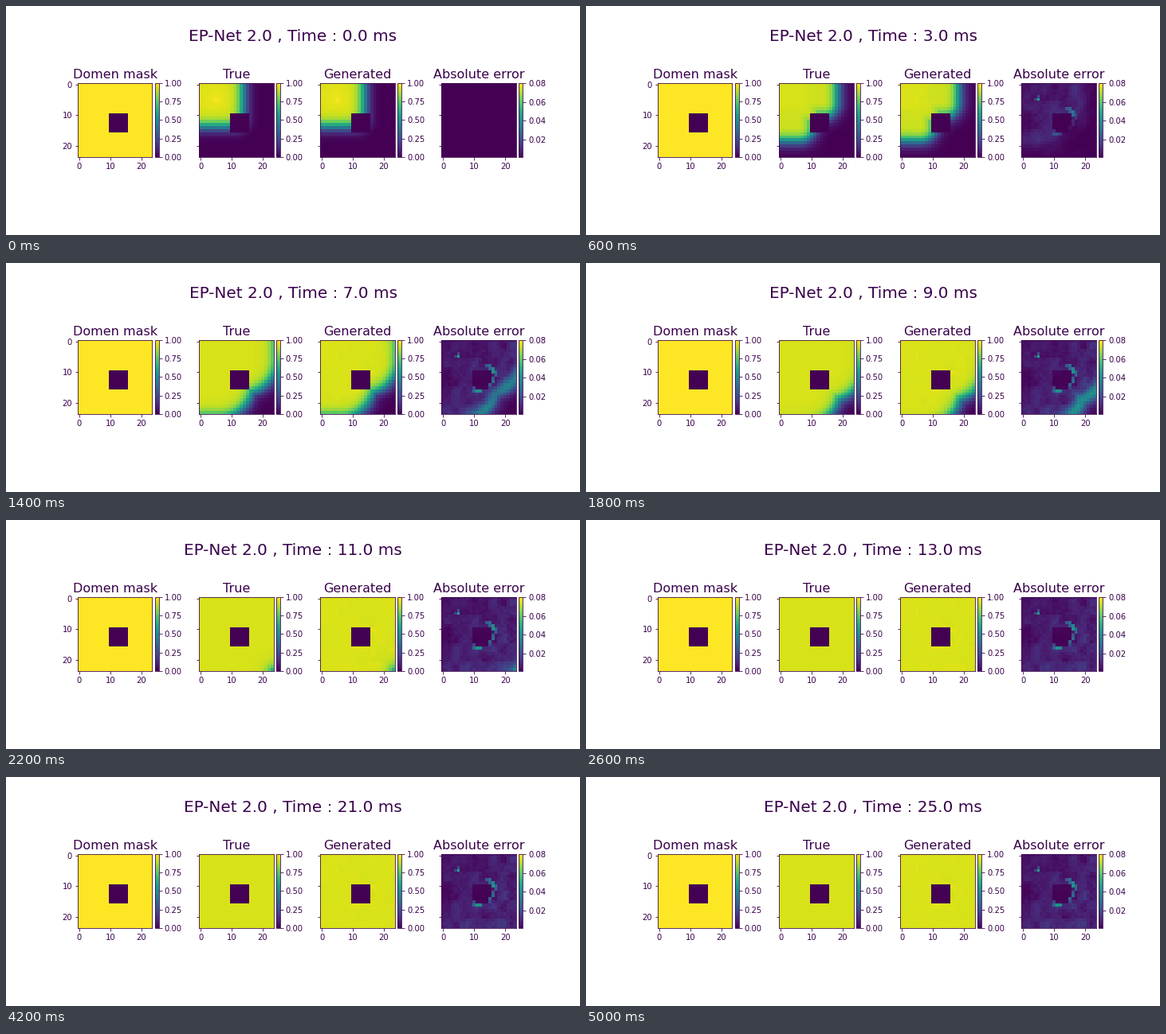
A matplotlib script for the animation above (5200 ms loop, 720 px wide and 288 px high).

```python
import numpy as np
import matplotlib.pyplot as plt
from matplotlib.animation import FuncAnimation

W, H, DPI = 720, 288, 72
N = 24
FRAMES, STEP = 26, 200
INK = "#38014a"
REST = 0.94          # level behind the wave
SPEED = 1.56         # cells per ms
EDGE, PIVOT = 13.7, 6
SOFT = 0.75          # front thickness in ms

for key in ("text.color", "axes.edgecolor", "axes.labelcolor",
            "xtick.color", "ytick.color"):
    plt.rcParams[key] = INK
plt.rcParams["font.family"] = "DejaVu Sans"

yy, xx = np.mgrid[0:N, 0:N].astype(float)
mask = np.ones((N, N))
mask[10:16, 10:16] = 0


def sigmoid(u):
    return 1 / (1 + np.exp(-np.clip(u, -40, 40)))


def arrival(along, across):
    """Time at which a plane front, bending round the hole, gets to a cell."""
    ahead = np.maximum(along - EDGE, 0)
    aside = np.maximum(across - PIVOT, 0)
    return np.hypot(ahead, aside) / SPEED


reach = np.minimum(arrival(xx, yy), arrival(yy, xx))
start = sigmoid((EDGE - xx) / 1.1) * sigmoid((EDGE - yy) / 1.1)
dist2 = (xx - 5) ** 2 + (yy - 5) ** 2
glow = 0.025 * np.exp(-dist2 / 30) + 0.035 * np.exp(-dist2 / 0.9)


def warp(t):
    return t + max(0, t - 9)


def true_field(t):
    wave = sigmoid((warp(t) - reach) / SOFT) if t else 0
    level = REST * np.maximum(start, wave) + glow * np.exp(-t / 0.8)
    return level * mask


# Steady part of the network's error: blocky noise and a few hot cells.
rng = np.random.default_rng(7)
coarse = np.kron(rng.random((8, 8)), np.ones((3, 3)))
coarse = (coarse + np.roll(coarse, 1, 0) + np.roll(coarse, 1, 1)) / 3
fine = rng.random((N, N))
slope = 0.35 + 0.4 * xx / N + 0.3 * yy / N
noise = 0.013 * slope * (0.25 + 0.9 * coarse + 0.35 * fine)
noise *= np.where(mask > 0, 1, 0.25)

HOT = [(5, 5, .046), (4, 5, .020), (5, 4, .018),
       (8, 14, .024), (8, 15, .028), (9, 15, .026), (9, 16, .038),
       (10, 16, .042), (10, 17, .030), (11, 17, .028), (12, 16, .024),
       (13, 16, .030), (14, 15, .026), (15, 15, .018),
       (15, 10, .018), (16, 10, .028), (16, 11, .042), (16, 12, .040)]
hot = np.zeros((N, N))
for r, c, v in HOT:
    hot[r, c] = v

front_gain = 0.005 + 0.03 * np.clip((xx + yy - 29) / 7, 0, 1)
sign = np.where(coarse > 0.45, 1, -0.5)


def error_field(t):
    wave = sigmoid((warp(t) - reach) / SOFT)
    ramp = min(1, t / 3)
    front = front_gain * 4 * wave * (1 - wave) * mask
    ripple = 1 + 0.15 * np.sin(1.3 * xx + 0.9 * yy + t) * np.exp(-t / 8)
    lit = 0.15 + 0.85 * wave
    return ramp * (np.maximum(noise * ripple, hot) * lit + front)


def made_field(t, err):
    made = true_field(t) + 0.5 * sign * np.minimum(err, 0.04)
    return np.clip(made, 0, 1) * np.where(mask > 0, 1, 0.3)


fig = plt.figure(figsize=(W / DPI, H / DPI), dpi=DPI, facecolor="white")

GAP, PAD = 50.4, 3.6
SIDE = ((558 - 3 * GAP) / 4 - PAD) / 1.05
BAR = 0.05 * SIDE
PITCH = SIDE + PAD + BAR + GAP
BASE = 0.5025 * H - SIDE / 2


def box(x, w):
    return fig.add_axes([x / W, BASE / H, w / W, SIDE / H])


def panel(i, title, data, lo, hi, ticks):
    x = 90 + i * PITCH
    ax = box(x, SIDE)
    im = ax.imshow(data, cmap="viridis", vmin=lo, vmax=hi,
                   interpolation="nearest")
    ax.set_title(title, fontsize=16)
    ax.set_xticks([0, 10, 20])
    ax.set_yticks([0, 10, 20])
    ax.tick_params(labelleft=(i == 0))
    bar = fig.colorbar(im, cax=box(x + SIDE + PAD, BAR), ticks=ticks)
    bar.ax.yaxis.set_major_formatter("{x:.2f}")
    return im


quarters = [0, 0.25, 0.5, 0.75, 1]
blank = np.zeros((N, N))
panel(0, "Domen mask", mask, 0, 1, quarters)
true_im = panel(1, "True", blank, 0, 1, quarters)
made_im = panel(2, "Generated", blank, 0, 1, quarters)
err_im = panel(3, "Absolute error", blank, 0.0012, 0.0805,
               [0.02, 0.04, 0.06, 0.08])
head = fig.suptitle("", x=0.5, y=0.9, fontsize=20)


def draw(t):
    err = error_field(t)
    true_im.set_data(true_field(t))
    made_im.set_data(made_field(t, err))
    err_im.set_data(err)
    head.set_text(f"EP-Net 2.0 , Time : {t:.1f} ms")
    return true_im, made_im, err_im, head


anim = FuncAnimation(fig, draw, frames=FRAMES, interval=STEP,
                     repeat=True, repeat_delay=0, blit=False)
plt.show()
```
